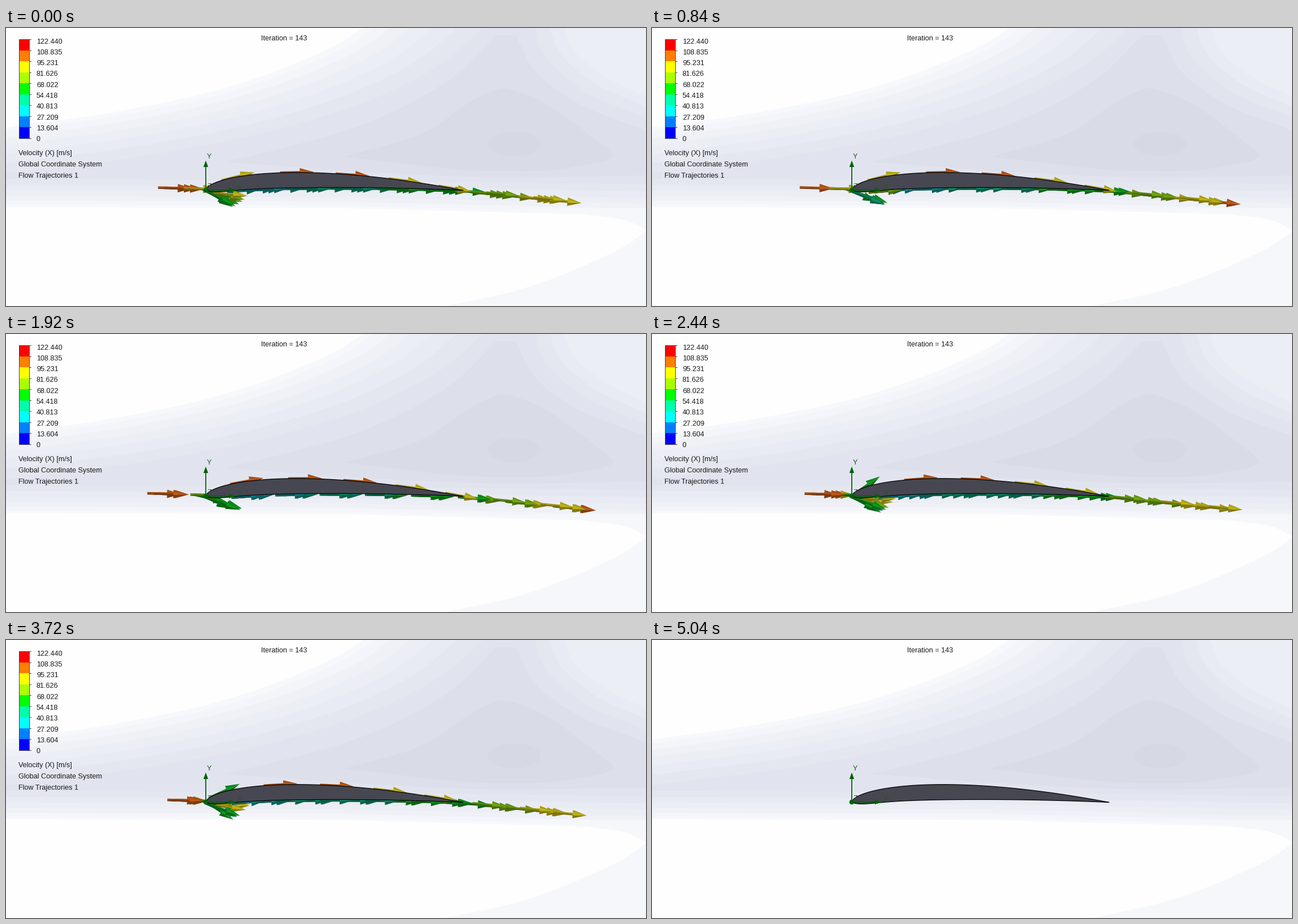
A matplotlib script that plays this animation: 1134x494 px, repeating every 5080 ms.

```python
import numpy as np
import matplotlib.pyplot as plt
from matplotlib.animation import FuncAnimation
from matplotlib.collections import PolyCollection
from matplotlib.patches import Circle, Ellipse, Polygon, Rectangle

W, H, FRAMES, STEP = 1134, 494, 127, 40
NOSE, CHORD, BASE = 354, 456, 288.5
plt.rcParams["font.family"] = "Liberation Sans"


def rgb(*c):
    return tuple(v / 255 for v in c)


def mix(a, b, t):
    return np.array(a) * (1 - t) + np.array(b) * t


def smooth(pts, n=14):
    """Cubic curve through the points, parametrised by chord length."""
    p = np.array(pts, float)
    t = np.r_[0, np.cumsum(np.hypot(*np.diff(p, axis=0).T))]
    m = np.gradient(p, t, axis=0)
    u = np.linspace(0, 1, n)[:, None]
    out = []
    for i in range(len(p) - 1):
        h = t[i + 1] - t[i]
        out.append((1 + 2 * u) * (1 - u) ** 2 * p[i] + u * (1 - u) ** 2 * h * m[i]
                   + u * u * (3 - 2 * u) * p[i + 1] + u * u * (u - 1) * h * m[i + 1])
    return np.vstack(out)


def foil_top(u):
    return 87 * u ** 0.55 * (1 - u)


def foil_bottom(u):
    return 20 * u * (1 - u) - 200 * u * np.exp(-20 * u)


fig = plt.figure(figsize=(W / 100, H / 100), dpi=100)
ax = fig.add_axes([0, 0, 1, 1])
ax.set_xlim(0, W)
ax.set_ylim(H, 0)
ax.axis("off")


def fill(parts, color, z=0, **kw):
    ax.add_patch(Polygon(np.vstack(parts), fc=color, zorder=z, **kw))


def label(x, y, s, color=rgb(25, 25, 25), z=9):
    return ax.text(x, y + 4.5, s, fontsize=12.6 * 0.72, color=color, zorder=z)


# Background: bands blended from an outer to an inner contour
WHITE = rgb(253, 254, 253)
OUTER = [(0, 177), (200, 148), (400, 103), (520, 60), (600, 22), (632, 0)]
INNER = [(0, 258), (300, 218), (500, 175), (680, 113), (780, 57), (845, 0)]
CORNER = [(1060, 0), (1075, 30), (1110, 50), (W, 70)]
NECK = [(938, 0), (945, 30), (1010, 102), (W, 160)]

fill([[(0, 0), (W, 0), (W, H), (0, H)]], WHITE)
for k in range(7):
    t = (k / 6) ** 1.35
    right = smooth(mix(CORNER, NECK, t)) if t > 0.5 else [(W, 0)]
    bottom = [(W, mix(334, 278, t)), (600, mix(320, 271, t)), (0, mix(318, 268, t))]
    fill([smooth(mix(OUTER, INNER, t)), right, bottom],
         rgb(*mix((247, 248, 252), (225, 228, 238), k / 6)))
fill([smooth([(390, 238), (500, 211), (600, 183), (700, 142), (800, 81), (868, 13)]),
      smooth([(903, 13), (935, 74), (1000, 126), (W, 182)]),
      smooth([(W, 262), (850, 265), (550, 250), (390, 238)])], rgb(221, 223, 235))
fill([smooth([(600, 229), (740, 186), (855, 115), (880, 107), (912, 115),
              (1040, 195), (1075, 225), (1000, 248), (880, 254), (600, 229)])],
     rgb(217, 220, 231))
ax.add_patch(Ellipse((900, 206), 93, 44, fc=rgb(214, 216, 228), zorder=0))
fill([smooth([(900, 321), (1040, 333), (1110, 346), (W, 359)]),
      smooth([(W, 361), (1110, 379), (1030, 420), (920, 462), (780, H)]),
      [(W, H), (W, 320)]], rgb(246, 247, 251))

# Wing section
u = np.linspace(0, 1, 150) ** 2
x = NOSE + CHORD * u
fill([np.c_[x, BASE - foil_top(u)], np.c_[x, BASE - foil_bottom(u)][::-1]],
     rgb(70, 71, 80), z=4, ec="black", lw=0.9)

# Axis triad
GREEN = rgb(0, 98, 8)
ax.plot([354, 354, 400], [242, 288, 288], color=GREEN, lw=1.3, zorder=5)
fill([[(354, 235.5), (349.8, 247), (358.2, 247)]], GREEN, 5)
fill([[(407, 288), (395, 283.8), (395, 292.2)]], GREEN, 5)
ax.add_patch(Circle((354, 288), 4.3, fc=GREEN, zorder=6))
for x, y, s in [(356, 227, "Y"), (357, 280, "Z"), (410, 282, "X")]:
    label(x, y, s, rgb(35, 85, 40), 6)

label(452, 18, "Iteration = 143")

# Legend
legend = []
SCALE = [(255, 0, 0), (255, 128, 0), (255, 255, 0), (170, 255, 0), (0, 255, 0),
         (0, 255, 170), (0, 255, 255), (0, 128, 255), (0, 0, 255)]
CELL = 175 / len(SCALE)
INK = dict(color=rgb(70, 70, 70), lw=0.72, zorder=9)
for i, c in enumerate(SCALE):
    legend.append(ax.add_patch(
        Rectangle((22.5, 20.5 + i * CELL), 18, CELL, fc=rgb(*c), zorder=8)))
legend += ax.plot([22.5, 40.5, 40.5, 22.5, 22.5], [20.5, 20.5, 195.5, 195.5, 20.5], **INK)
for i in range(10):
    y = 20.5 + i * CELL
    legend += ax.plot([41, 44], [y, y], **INK)
    value = 122.4396 * (9 - i) / 9
    legend.append(label(54, 23 + i * 19.3, f"{value:.3f}" if i < 9 else "0"))
for i, s in enumerate(["Velocity (X) [m/s]", "Global Coordinate System",
                       "Flow Trajectories 1"]):
    legend.append(label(22, 221 + 20 * i, s))

# Flow arrows: cyan, teal, green, lime, yellow, orange from slow to fast
COLORS = [(15, 140, 142), (15, 142, 105), (12, 150, 28), (112, 165, 15),
          (190, 178, 20), (188, 88, 22)]
SHAPES = [([(0, -2.3), (37, -2.3), (37, 0), (0, 0)], 0.85),
          ([(0, 0), (37, 0), (37, 2.3), (0, 2.3)], 0.62),
          ([(35, -7.5), (60, 0), (35, 0)], 0.88),
          ([(35, -4), (60, 0), (35, 2)], 1.0),
          ([(35, 2), (60, 0), (35, 7.5)], 0.68)]
X = np.arange(250, 1010)
END = 987
U = (X - NOSE) / CHORD
CLIP = np.clip(U, 0, 1)
WAKE = np.maximum(X - NOSE - CHORD, 0)


def bump(center, width):
    return np.exp(-((X - center) / width) ** 2)


class Stream:
    """Arrows that approach the nose, follow one face and leave in the wake."""

    def __init__(self, face, gap, lift, brake, kick, tint, anchor):
        surface = BASE + gap - face(CLIP) + 0.1 * WAKE
        self.y = np.where(U < 0, 283 + 0.03 * (X - X[0]), surface)
        ahead = np.interp(X + 20, X, self.y)
        ahead = np.where(X + 20 > X[-1], self.y + 2, ahead)
        self.angle = np.arctan((ahead - self.y) / 20) + np.radians(kick) * bump(357, 12)
        on_foil = (U >= 0) & (U <= 1)
        speed = 84 + lift * (1 - U) * on_foil - brake * bump(357, 15)
        self.s = np.cumsum(1 / speed)
        self.s -= np.interp(anchor, X, self.s)
        approach = 5.6 - 3.5 * bump(355, 45)
        self.tint = np.clip(np.where(U < 0, approach, tint), 0, 5).astype(int)

    def arrows(self, phase):
        first = np.ceil(self.s[0] - phase) + phase
        for s in np.arange(first, np.interp(END, X, self.s), 1):
            x = np.interp(s, self.s, X)
            y, a = np.interp(x, X, self.y), np.interp(x, X, self.angle)
            color = COLORS[self.tint[int(x) - X[0]]]
            rot = np.array([[np.cos(a), np.sin(a)], [-np.sin(a), np.cos(a)]])
            for shape, shade in SHAPES:
                yield np.array(shape) @ rot + (x, y), rgb(*(v * shade for v in color))


upper = Stream(foil_top, 0, 24, 55, 0,
               6.7 - 2.9 * CLIP - 4.3 * bump(355, 28) + WAKE / 300, 382)
lower = Stream(foil_bottom, 1.5, -8, 67, 17,
               0.25 + 2.8 * CLIP + 4.6 * bump(372, 16) + WAKE / 85, 960)
# (stream, arrows released per tick, starting phase)
RELEASES = [(lower, 0.1905, 0), (lower, 0.1862, 0.37), (lower, 0.162, 0.5),
            (lower, 0.1557, 0.63), (upper, 4 / 21, 0)]

flow = PolyCollection([], linewidths=0, zorder=3)
ax.add_collection(flow, autolim=False)


def update(i):
    live = i < FRAMES - 1
    for item in legend:
        item.set_visible(live)
    parts = [p for stream, rate, phase in RELEASES
             for p in stream.arrows((phase + rate * i) % 1)] if live else []
    flow.set_verts([v for v, _ in parts])
    flow.set_facecolor([c for _, c in parts])
    return [flow, *legend]


anim = FuncAnimation(fig, update, frames=FRAMES, interval=STEP, repeat=True,
                     repeat_delay=0, blit=False)
plt.show()
```
